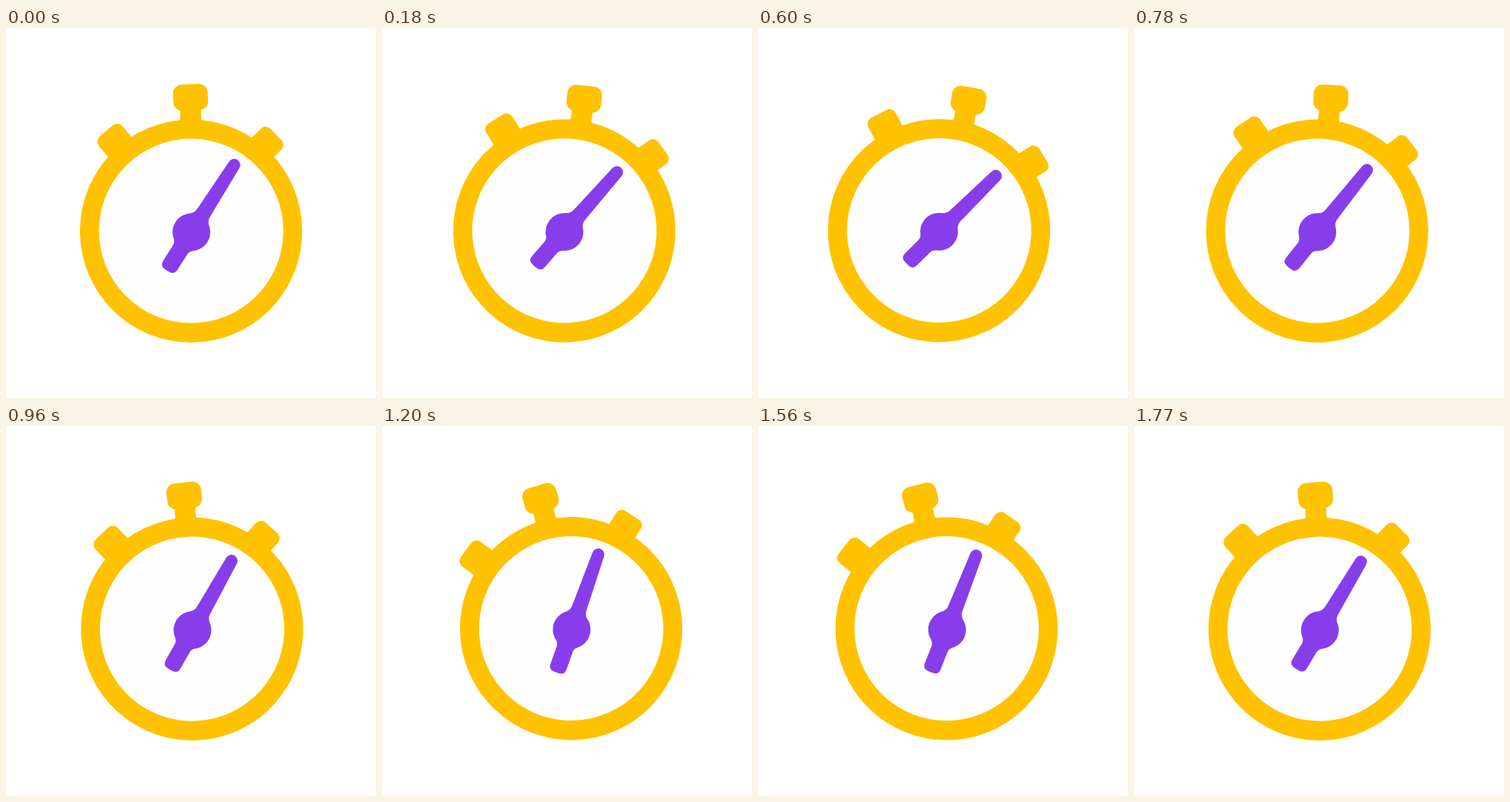
Recreate the animation shown at these times as an HTML page. Size 480 by 480 pixels, loop 1.8 s.

```html
<!DOCTYPE html>
<html lang="en">
<head>
<meta charset="utf-8">
<title>Swinging stopwatch</title>
<style>
  html, body { margin: 0; width: 100%; height: 100%; overflow: hidden; background: #fff; }
  svg { display: block; width: 100vw; height: 100vh; }
</style>
</head>
<body>
<svg viewBox="0 0 480 480">
  <g id="watch">
    <g fill="#ffc200">
      <rect x="216.8" y="73" width="45.2" height="34" rx="11.5" transform="rotate(-3 239.4 90)"/>
      <path d="M226 100 V117 Q226 120 222 121 V130 H257 V121 Q253 120 253 117 V100 Z"/>
      <g transform="translate(240 263.5)">
        <rect x="-19.2" y="-170.3" width="40" height="37" rx="9" transform="rotate(-40.5)"/>
        <rect x="-19" y="-17" width="38" height="34" rx="8.5" transform="rotate(40.8) translate(0 -150) rotate(5)"/>
      </g>
      <ellipse cx="240.1" cy="263.4" rx="144.2" ry="144.7"/>
    </g>
    <circle cx="240.2" cy="263.2" r="119.6" fill="#fefefe"/>
    <g fill="#873eea" transform="translate(240.5 264.8) rotate(32.5)">
      <circle r="24.5"/>
      <path d="M-14 -20 Q-10 -24 -9.8 -29 L-7.9 -103.2 A7.9 7.9 0 0 1 7.9 -103.2 L9.8 -29 Q10 -24 14 -20 Z"/>
      <path d="M-14.5 19.5 Q-11 23 -11 27 V51 Q-11 59 -3 59 H3 Q11 59 11 51 V27 Q11 23 14.5 19.5 Z"/>
    </g>
  </g>
</svg>
<script>
  const LOOP = 1800, STEP = 30, SWING = 15;
  const watch = document.getElementById('watch');
  const start = performance.now();

  function draw(elapsed) {
    const time = Math.floor((elapsed % LOOP) / STEP) * STEP;
    const angle = SWING * Math.sin(2 * Math.PI * time / LOOP);
    watch.setAttribute('transform', `rotate(${angle} 240 240)`);
  }

  function tick() {
    draw(performance.now() - start);
    requestAnimationFrame(tick);
  }
  tick();
</script>
</body>
</html>
```
